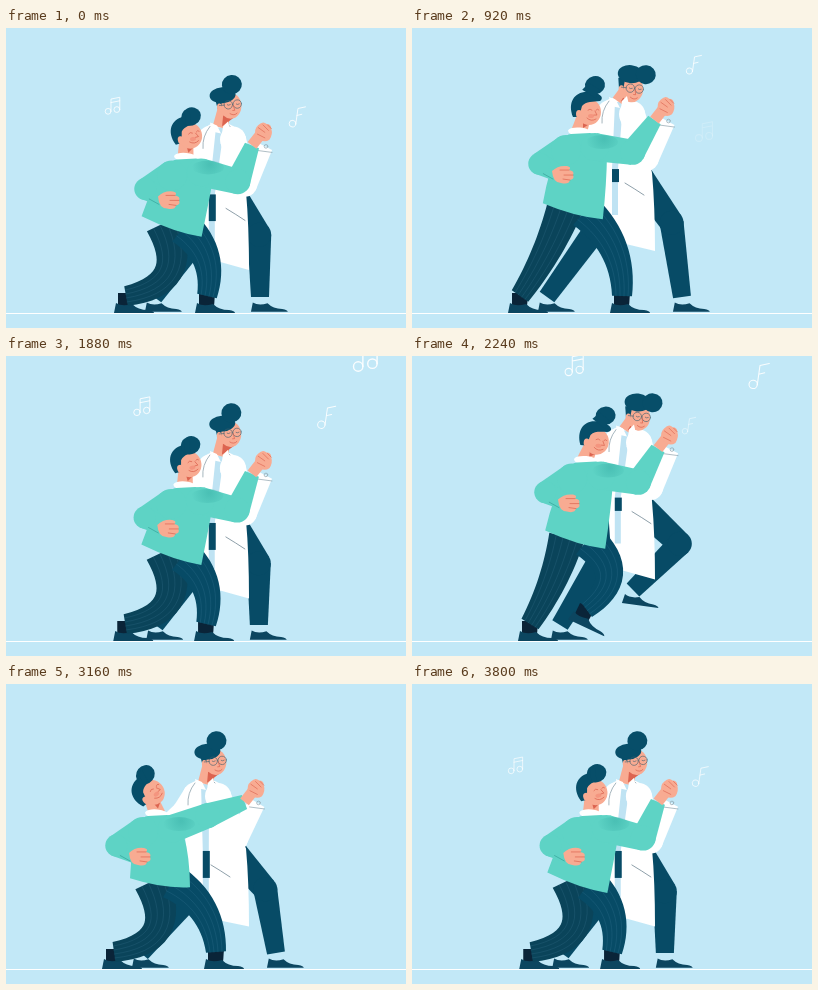
An HTML page with a canvas for the animation above (3840 ms loop, 400 px wide and 300 px high).

```html
<!DOCTYPE html>
<html lang="en">
<head>
<meta charset="utf-8">
<title>Dancing pair</title>
<style>
html, body { margin: 0; width: 100%; height: 100%; overflow: hidden; background: #c2e8f7; }
canvas { display: block; width: 400px; height: 300px; }
</style>
</head>
<body>
<canvas id="stage" width="400" height="300"></canvas>
<script>
const ctx = document.getElementById('stage').getContext('2d');
const LOOP = 3840, DANCE = 1920, BOUNCE = 640, FLOOR = 268;
const STOPS = [0, 320, 640, 920, 1240, 1520, DANCE];
const SKY = '#c2e8f7', NAVY = '#074b66', DEEP = '#0a445a', SHOE = '#0c4660', HAIR = '#074e69',
  TEAL = '#5ed3c5', SKIN = '#f8ab92', RED = '#dc6450', GREY = '#8fa3ad', WHITE = '#fff';

const add = (p, x, y) => [p[0] + x, p[1] + y];
const mix = (a, b, u) => [a[0] + (b[0] - a[0]) * u, a[1] + (b[1] - a[1]) * u];

// Eased value through the stops of one dance cycle.
function sway(t, ...values) {
  const i = STOPS.findIndex(stop => t < stop) - 1;
  const u = (t - STOPS[i]) / (STOPS[i + 1] - STOPS[i]);
  const from = values[i], to = values[(i + 1) % values.length];
  return from + (to - from) * u * u * (3 - 2 * u);
}
// Smooth bump of height 1 around a moment of the cycle.
function bump(t, centre) {
  const d = (t - centre + DANCE * 1.5) % DANCE - DANCE / 2;
  return Math.abs(d) < 280 ? Math.cos(Math.PI * d / 560) ** 2 : 0;
}
function foot(x, lift, height, turn) {
  return { at: [x, FLOOR - height * lift], angle: turn * lift, lift };
}
// Knee pushed forward from the line between hip and ankle.
function knee(hip, ankle, push, u = 0.5) {
  const dx = ankle[0] - hip[0], dy = ankle[1] - hip[1], length = Math.hypot(dx, dy);
  return add(mix(hip, ankle, u), push * dy / length, -push * dx / length);
}
// Elbow of an arm with two fixed lengths; side picks the bend.
function elbow(shoulder, hand, upper, lower, side) {
  const dx = hand[0] - shoulder[0], dy = hand[1] - shoulder[1], length = Math.hypot(dx, dy);
  const along = Math.min(length / 2 + (upper ** 2 - lower ** 2) / (2 * length), length / 2 + 5);
  const out = side * Math.sqrt(Math.max(0, upper ** 2 - along ** 2));
  return add(shoulder, (dx * along - dy * out) / length, (dy * along + dx * out) / length);
}

function shape(path, fill) {
  ctx.fillStyle = fill;
  ctx.fill(new Path2D(path));
}
function line(path, color, width = 1) {
  ctx.strokeStyle = color;
  ctx.lineWidth = width;
  ctx.stroke(new Path2D(path));
}
function oval(x, y, rx, ry, fill, turn = 0) {
  ctx.fillStyle = fill;
  ctx.beginPath();
  ctx.ellipse(x, y, rx, ry, turn, 0, 7);
  ctx.fill();
}
function ring(x, y, r, color, width = 1) {
  ctx.strokeStyle = color;
  ctx.lineWidth = width;
  ctx.beginPath();
  ctx.arc(x, y, r, 0, 7);
  ctx.stroke();
}
function placed([x, y], degrees, scale, draw) {
  ctx.save();
  ctx.translate(x, y);
  ctx.rotate(degrees * Math.PI / 180);
  ctx.scale(scale, scale);
  draw();
  ctx.restore();
}

function bone(a, b, ra, rb, fill) {
  const angle = Math.atan2(b[1] - a[1], b[0] - a[0]);
  const nx = -Math.sin(angle), ny = Math.cos(angle);
  shape(`M${add(a, nx * ra, ny * ra)}L${add(b, nx * rb, ny * rb)}L${add(b, -nx * rb, -ny * rb)}L${add(a, -nx * ra, -ny * ra)}Z`, fill);
}
function limb(a, b, c, [ra, rb, rc], fill) {
  bone(a, b, ra, rb, fill);
  bone(b, c, rb, rc, fill);
  oval(...a, ra, ra, fill);
  oval(...b, rb, rb, fill);
}
// Points beside a curve from a past b to c; side runs from -1 to 1 across a tapering width.
function edge(a, b, c, wide, narrow, side) {
  const pull = mix(mix(a, c, 0.5), b, 1.6), points = [];
  for (let u = 0; u <= 1.001; u += 1 / 16) {
    const p = mix(a, pull, u), q = mix(pull, c, u);
    const angle = Math.atan2(q[1] - p[1], q[0] - p[0]);
    const r = side * (wide + (narrow - wide) * u);
    points.push(add(mix(p, q, u), -Math.sin(angle) * r, Math.cos(angle) * r));
  }
  return points;
}

function shoe({ at, angle }, scale, sock) {
  placed(at, angle, scale, () => {
    shape('M-8 -3H8L7 11H-8Z', sock);
    shape('M-12 17L-10 7Q-4 11 6 8Q12 14 22 14Q28 15 28 17Z', SHOE);
  });
}
function manLeg(hip, step, push, color) {
  const curve = [hip, knee(hip, step.at, push), step.at, 18, 10];
  shoe(step, 1, '#0a2438');
  shape(`M${edge(...curve, 1).join('L')}L${edge(...curve, -1).reverse().join('L')}Z`, color);
  for (const side of [-0.6, -0.2, 0.2, 0.6])
    line(`M${edge(...curve, side).join('L')}`, 'rgba(90,150,180,.22)', 0.7);
}
function docLeg(hip, step, push) {
  shoe(step, 0.92, SKY);
  limb(hip, knee(hip, step.at, push, 0.42), add(step.at, -2, 1), [14, 12, 9], NAVY);
}

function manHead(collar, tilt, crouch) {
  placed(collar, tilt, 1, () => {
    bone([4, -14], [-1, 2], 7, 8, SKIN);
    shape('M3 -8L13 -8L3 -2Z', RED);
    ctx.translate(8, -20);
    oval(1, 2, 12, 13, SKIN);
    shape('M-15 7C-21 -8 -13 -19 0 -18C12 -18 17 -12 12 -9C5 -8 -2 -9 -6 -4L-9 7Z', HAIR);
    oval(7, 9 * crouch - 25, 10, 9, HAIR, -0.2);
    if (crouch < 1) bone([1, -16], [6, 9 * crouch - 24], 8, 6, HAIR);
    oval(-9, 4, 3, 4, SKIN);
    oval(3, 6, 3, 2, '#f4957f');
    line('M0 0q2 -2 4 0M8 0q2 -2 3 0M7 1l2 4h-3M-1 8q4 4 9 1', RED, 0.7);
  });
}
function docHead(collar, crouch) {
  placed(collar, 6 - 11 * crouch, 1, () => {
    const rise = 13 + 7 * crouch;
    bone([6, 4 - rise], [0, 2], 7, 7.5, SKIN);
    shape(`M4 ${10 - rise}L15 ${13 - rise}L2 1Z`, RED);
    ctx.translate(10, -rise);
    oval(2, 1, 11, 13, SKIN);
    shape('M-13 -9L-6 -9L-7 2L-11 3Z', HAIR);
    oval(-1 - 4 * crouch, 4 * crouch - 14, 13, 9 - crouch, HAIR);
    oval(14 - 9 * crouch, -15 - 5 * crouch, 10, 9.5, HAIR);
    oval(-9, 2, 2.5, 4, SKIN);
    ring(0, 0, 4.2, '#3c6070', 0.6);
    ring(9, 0, 4.2, '#3c6070', 0.6);
    line('M-4 0h-5M-1 0q1 1 3 0M8 0q1 1 3 0', '#3c6070', 0.6);
    line('M5 1l1 5h-2M1 9q4 3 7 0', RED, 0.7);
  });
}

function doctor(t, c, cuff, crouch) {
  const front = [243, 229 + 0.75 * (c[1] - 80)], back = [c[0] - 14, front[1] - 12];
  const shoulder = add(c, 13, 14), belt = [200 + 0.4 * (c[0] - 207), c[1] + 69];
  const backLift = bump(t, 1520), frontLift = bump(t, 320);
  docLeg(add(front, -25, -70), foot(sway(t, 150, 150, 137, 137, 137, 199), backLift, 43, 15), 37 * backLift);
  docLeg(add(front, -15, -73), foot(sway(t, 256, 223, 272, 272, 272, 214), frontLift, 35, 8),
    14 + 28 * frontLift - 14 * backLift);

  limb(add(c, -9, 13), add(c, -22, 30), add(c, -36, 42), [13, 11, 10], WHITE);
  shape(`M${add(c, -8, -2)}Q${add(c, -22, 4)} ${add(c, -22, 24)}L${add(c, -18, 80)}L${back}L${front}` +
    `Q${add(front, 0, -45)} ${add(front, -3, -78)}L${add(c, 24, 30)}Q${add(c, 25, 5)} ${add(c, 10, -1)}Z`, WHITE);
  shape(`M${add(c, -4, 2)}L${add(c, 4, 2)}L${add(belt, 6, 0)}v46h-6L${belt}Z`, '#bfe3f3');
  shape(`M${belt}h7v${13 + 14 * crouch}h-7Z`, NAVY);
  line(`M${add(c, 9, 0)}q12 10 12 24t-7 20M${add(c, -10, 1)}q-8 10 -7 22`, GREY, 0.8);
  line(`M${add(c, 6, 83)}q10 6 19 12`, '#5d7684', 0.7);
  limb(shoulder, elbow(shoulder, cuff, 47, 36, 1), cuff, [13, 12, 8], WHITE);
  line(`M${add(cuff, -8, 4)}l15 2`, GREY, 0.7);
  ring(...add(cuff, 1, 0), 1.8, GREY, 0.7);
  docHead(c, crouch);
  shape(`M${add(c, -10, -3)}l7 3l4 8l-9 -2ZM${add(c, 8, -4)}l-5 5l-1 7l8 -3Z`, WHITE);
}

function man(t, c, cuff, crouch) {
  const lean = 0.4 * (c[0] - 166), slant = (15 + lean) / 2;
  const waist = [160 + lean, 188 + 0.6 * (c[1] - 110)];
  const back = add(waist, -30, -slant), front = add(waist, 30, slant);
  const shoulder = add(c, 15, 17), behind = add(c, -14, 20), hand = add(c, -18, 45);
  const backElbow = elbow(behind, hand, 30, 24, 1);
  const backLift = bump(t, 1520), frontLift = bump(t, 320);
  manLeg(mix(back, front, 0.36), foot(sway(t, 120, 118, 108, 108, 108, 92), backLift, 60, 112),
    4 + 30 * crouch + 28 * backLift, DEEP);
  manLeg(add(mix(back, front, 0.7), 0, -3), foot(sway(t, 201, 174, 210, 210, 210, 166), frontLift, 15, 25),
    14 + 14 * frontLift - 6 * backLift, NAVY);

  manHead(c, sway(t, -15, 6, -6, 0, -40, -10), crouch);
  oval(...add(c, 0, 2), 12, 4.5, WHITE, 0.1);
  shape(`M${back}Q${add(mix(back, c, 0.5), -12, 0)} ${add(c, -19, 12)}Q${add(c, -14, 4)} ${add(c, -9, 4)}` +
    `L${add(c, 10, 3)}Q${add(c, 24, 5)} ${add(c, 27, 24)}Q${add(mix(c, front, 0.6), 13, 0)} ${front}` +
    `Q${add(waist, 3, 6)} ${back}Z`, TEAL);
  limb(shoulder, elbow(shoulder, cuff, 38, 39, 1), cuff, [14, 12.5, 7.5], TEAL);
  limb(behind, backElbow, hand, [15, 11, 8], TEAL);
  const shade = ctx.createRadialGradient(...add(c, 24, 9), 1, ...add(c, 24, 9), 18);
  shade.addColorStop(0, 'rgba(30,150,145,.3)');
  shade.addColorStop(1, 'rgba(30,150,145,0)');
  oval(...add(c, 22, 12), 16, 7, shade);
  line(`M${add(backElbow, 4, 10)}L${add(hand, -9, 4)}`, '#3aa99f', 0.8);

  placed(hand, 0, 1, () => {
    shape('M-10 -4Q-4 -10 5 -9Q10 -8 7 -5Q13 -4 11 0Q13 4 8 5Q7 10 -1 8Q-9 8 -10 -4Z', SKIN);
    line('M-2 -5L7 -5M2 0L11 0M1 4L8 5', RED, 0.7);
  });
  const grip = add(cuff, 11, -14);
  bone(cuff, grip, 5.5, 5.5, SKIN);
  placed(grip, 0, 0.92, () => {
    shape('M-8 5Q-10 -3 -5 -7Q0 -12 4 -8Q9 -8 9 -3Q11 3 7 9Q0 14 -8 5Z', SKIN);
    line('M-5 -4L2 1M0 -7L6 -1M5 -7L9 -3M-6 3L2 7', RED, 0.7);
  });
}

const notes = [
  { pair: true, x: 97, y: 97, drift: 33, size: 1, births: [1370, 3610] },
  { pair: false, x: 281, y: 109, drift: 33, size: 1, births: [1370, 3610] },
  { pair: false, x: 276, y: 82, drift: 5, size: 0.85, births: [433, 2096] },
  { pair: true, x: 292, y: 107, drift: 34, size: 1.25, births: [870] }
];
function drawNotes(t) {
  for (const { pair, x, y, drift, size, births } of notes)
    for (const birth of births) {
      const age = (t - birth + LOOP) % LOOP;
      const swing = 1 - Math.cos(Math.min(Math.PI, age / 290));
      const at = [x + drift * swing, y - age * (0.08 + age * 0.000025)];
      if (at[1] < -25) continue;
      ctx.globalAlpha = Math.min(0.9, age / 250);
      placed(at, pair ? 0 : 8, size * (0.8 + age / 3000), () => {
        if (pair) {
          ring(-5.5, 7, 3.3, WHITE);
          ring(4.5, 5, 3.3, WHITE);
          line('M-2.2 7V-7L7.8 -9V5M-2.2 -3L7.8 -5', WHITE);
        } else {
          ring(-4, 8, 3.8, WHITE);
          line('M-.2 8V-10L8 -13M-.2 -2L5 -4', WHITE);
        }
      });
    }
  ctx.globalAlpha = 1;
}

function frame(now) {
  const t = now % LOOP, beat = t % DANCE;
  const crouch = (1 + Math.cos(2 * Math.PI * (beat + 30) / BOUNCE)) / 2;
  const height = 102 + 26 * crouch - 14 * bump(beat, 1520);
  const manCollar = [sway(beat, 180, 174, 172, 168, 151, 154), height];
  const docCollar = [sway(beat, 214, 214, 211, 207, 199, 209), height - 30];
  const cuff = [152 + docCollar[0] / 2, docCollar[1] + 21];

  ctx.fillStyle = SKY;
  ctx.fillRect(0, 0, 400, 300);
  ctx.lineCap = ctx.lineJoin = 'round';
  drawNotes(t);
  line('M0 285.5H400', WHITE);
  doctor(beat, docCollar, cuff, crouch);
  man(beat, manCollar, add(cuff, -13, -1), crouch);
  requestAnimationFrame(frame);
}
requestAnimationFrame(frame);
</script>
</body>
</html>
```
